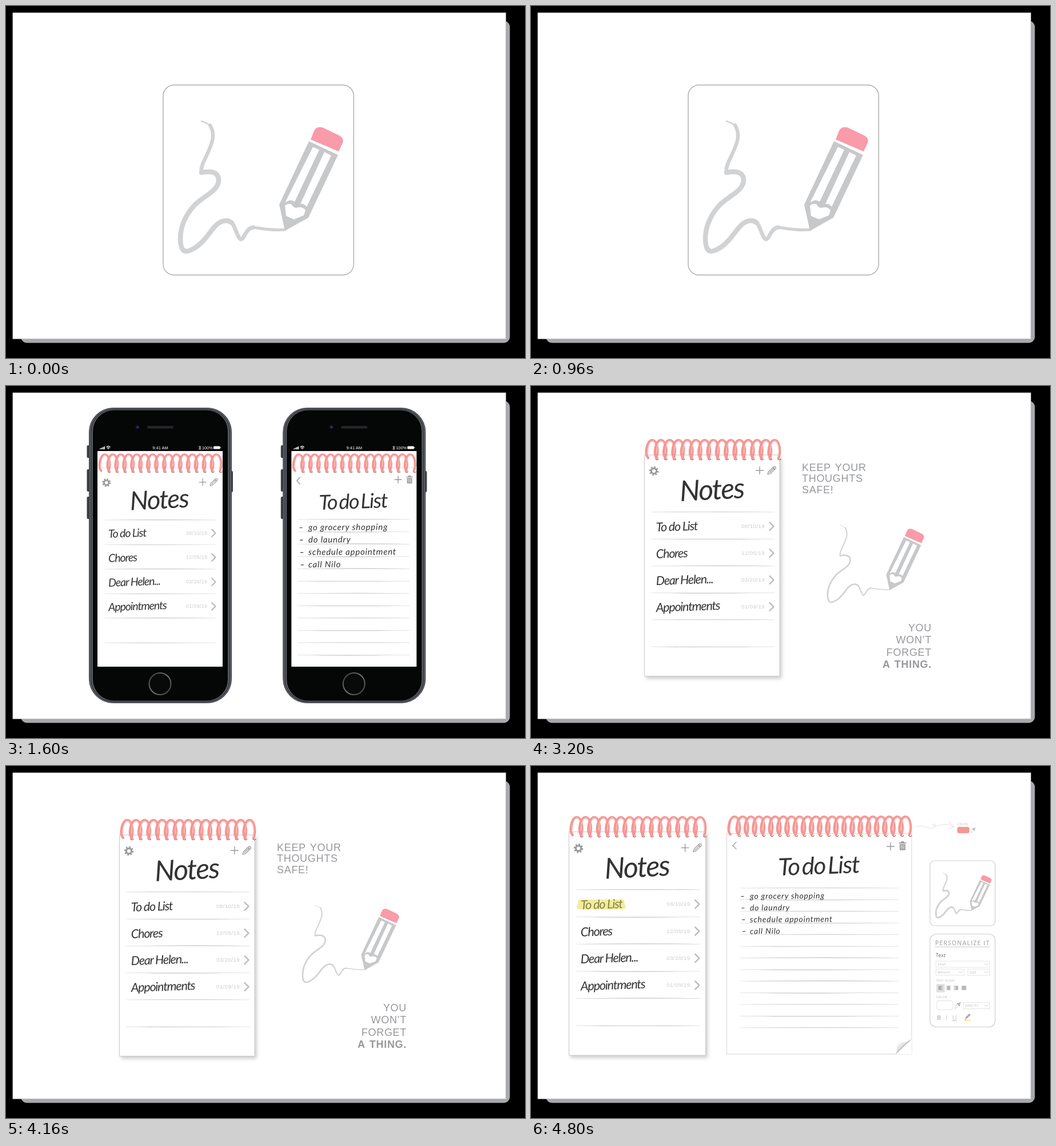
An HTML page that plays this animation: 908 px wide and 617 px high, repeating every 6400 ms.

```html
<!DOCTYPE html>
<html lang="en">
<head>
<meta charset="utf-8">
<title>Notes app</title>
<style>
html, body { margin: 0; width: 100%; height: 100%; overflow: hidden; background: #000; }
svg { display: block; }
text { white-space: pre; }
.hand { font-family: Lato, "Open Sans", sans-serif; font-style: italic; fill: #333; }
.title { word-spacing: -.1em; }
.sans { font-family: "Liberation Sans", Arial, sans-serif; }
.ui { font-family: "Open Sans", sans-serif; }
.line { fill: none; stroke-linecap: round; stroke-linejoin: round; }
.paper { fill: #fff; stroke: #ccc; filter: drop-shadow(3px 4px 3px #0003); }
</style>
</head>
<body>
<svg id="stage" width="908" height="617" viewBox="0 0 908 617"></svg>
<script>
const range = (n, f) => Array.from({ length: n }, (_, i) => f(i)).join('');
const group = (x, y, s, body) => `<g transform="translate(${x} ${y}) scale(${s})">${body}</g>`;
const line = (d, color, w) =>
  `<path class="line" d="${d}" stroke="${color}" stroke-width="${w}"/>`;
const shape = (d, color) => `<path d="${d}" fill="${color}"/>`;
const box = (x, y, w, h, r, fill, stroke = 'none', sw = 1) =>
  `<rect x="${x}" y="${y}" width="${w}" height="${h}" rx="${r}" fill="${fill}" stroke="${stroke}" stroke-width="${sw}"/>`;
const text = (cls, x, y, size, str, gap = 0, more = '') =>
  `<text class="${cls}" x="${x}" y="${y}" font-size="${size}" letter-spacing="${gap}" ${more}>${str}</text>`;
const tilt = (x, y, a) => `transform="rotate(${a} ${x} ${y})"`;

// Pencil with its scribble, in the coordinates of the large icon
function scribble(w) {
  const ink = '#d1d2d4';
  return line('M342 202 Q358 206 362 219', ink, w * .3) +
    line('M357 209 C368 228 359 244 350 264 C344 276 340 285 342 292', ink, w * .75) +
    line(`M342 292 C357 289 371 290 372 304 C373 324 345 333 329 350 C312 369 305 389 305 409
      C306 426 309 432 320 429 C341 422 353 401 364 388 C374 376 387 373 395 380`, ink, w) +
    line('M395 380 C402 387 404 406 411 409 C418 408 419 389 433 388', ink, w * .8) +
    line('M433 388 C447 390 465 394 488 392', ink, w * .6);
}
const pencil =
  shape('M533 234 L539 219 Q543 210 554 213 L581 226 Q592 231 589 240 L582 255Z', '#f99ba8') +
  shape('M530 237 L581 261 L529 371 L488 394 L478 348Z', '#c7c8ca') +
  shape('M537 247 L548 252 L505 343 Q497 337 488 345Z M557 256 L569 262 L526 352 Q521 346 515 347Z', '#fff') +
  shape('M488 350 Q494 344 500 348 Q504 356 511 353 Q520 352 524 358 L521 367 L504 374 L490 368Z', '#fff');
const icon = (x, y, s, w) => group(x, y, s, scribble(w) + pencil);

function coil(x, y, w, n) {
  const step = (w - 22) / (n - 1);
  return range(n, i => group(x + i * step, y, 1,
    line('M4 33 C-3 26 2 2 11 2 C19 2 23 20 18 33', '#f59693', 4.4) +
    line('M4 24 C3 12 7 3 12 3 C18 6 20 20 17 31', '#fcc4c1', 1.2) +
    line('M17 35 q3 3 5 0', '#b87272', 1.4)));
}

// Ruled lines, slightly bowed and tapering at the ends
const rules = (x, y, w, step, n) => range(n, i => {
  const b = y + i * step, bend = i % 2 ? 1 : -1;
  return shape(`M${x} ${b} Q${x + w * .4} ${b + bend + .7} ${x + w} ${b} Q${x + w * .6} ${b + bend - .7} ${x} ${b}Z`, '#aaa') +
    line(`M${x} ${b} h${w}`, '#d4d4d4', .6);
});

const plus = (x, y, r) => line(`M${x - r} ${y} h${2 * r} M${x} ${y - r} v${2 * r}`, '#999', 1.4);
const chevron = (x, y, w, h, color, sw) => line(`M${x} ${y - h} l${w} ${h} l${-w} ${h}`, color, sw);
const gear = (x, y) => `<g fill="none" stroke="#999"><circle cx="${x}" cy="${y}" r="4.6" stroke-width="3"/>
  <circle cx="${x}" cy="${y}" r="6.9" stroke-width="2.6" stroke-dasharray="2.71"/></g>`;
const pen = (x, y, s) => group(x, y, s,
  line('M-7 7 L-5.5 2 L4 -7 Q7 -8 7.5 -4 L-2 5.5Z M2 -5 L5.5 -1.5 M-4 4 L5 -5', '#999', 1.2));
const trash = (x, y, s) => group(x, y, s,
  line('M-6 -5 H6 M-2 -5 V-7 H2 V-5', '#888', 1.3) + box(-5, -3, 10, 10.5, 1, '#999') +
  line('M-2.5 -1 V5 M0 -1 V5 M2.5 -1 V5', '#fff', .9));

const entries = [['To do List', '08/10/19'], ['Chores', '12/05/19'],
  ['Dear Helen...', '03/20/19'], ['Appointments', '01/09/19']];

function notes(marked) {
  return coil(201, 93, 236, 15) + gear(215, 149) + plus(400, 148, 6.5) + pen(421, 148, 1) +
    text('hand', 261, 202, 50, 'Notes', -1.8, tilt(261, 202, -3)) +
    rules(211, 221, 215, 47.2, 6) +
    (marked ? line('M219 243 H290 M217 250 H292', '#f3ec9b', 10) : '') +
    entries.map(([name, date], i) => {
      const y = 255 + i * 47;
      return text('hand', 219, y, 21.5, name, -1.2,
          tilt(219, y, -2) + (marked && !i ? ' style="fill:#85834a"' : '')) +
        text('sans', 368, y - 6, 9.5, date, .5, 'fill="#ccc"') +
        chevron(417.5, y - 9, 7, 7, '#bbb', 2.4);
    }).join('');
}

const tasks = ['go grocery shopping', 'do laundry', 'schedule appointment', 'call Nilo'];
const todo = (x, y, size, step) => tasks.map((task, i) => {
  const b = y + i * step;
  return line(`M${x + i * .8} ${b - 4.5} h4`, '#333', 1.2) +
    text('hand', x + 15, b, size, task, .8, tilt(x, b, -.3));
}).join('');
const todoTitle = (x, y, size) => text('hand title', x, y, size, 'To do List', -1.5, tilt(x, y, -2));

const phone = `
  <g fill="#3b3c42"><rect x="141.5" y="104" width="6" height="22" rx="2"/>
  <rect x="141.5" y="146" width="6" height="39" rx="2"/><rect x="141.5" y="194" width="6" height="39" rx="2"/>
  <rect x="391" y="149" width="6" height="37" rx="2"/></g>` +
  box(145.5, 38.5, 249, 517, 42, '#5a5b61', '#3f4046') +
  box(149, 41, 242, 512, 39, '#5a5b61', '#2f3035', 1.2) +
  box(152, 42.5, 236, 509, 37, '#050606') +
  `<circle cx="230" cy="72" r="3.6" fill="#10182e"/><circle cx="230" cy="72" r="1.6" fill="#263f82"/>` +
  box(247, 70, 46, 4.5, 2.2, '#25262a') +
  `<circle cx="269.5" cy="522" r="19" fill="#080909" stroke="url(#ring)" stroke-width="2"/>` +
  box(160, 114, 219, 378, 0, '#fff') +
  range(4, i => box(164 + i * 2.4, 109.5 - i * 1.2, 1.7, 1.5 + i * 1.2, .3, '#fff')) +
  line('M176 107 q3 -3 6 0 M177.5 109 q1.5 -1.5 3 0', '#fff', 1.2) +
  shape('M178 110 h2 l-1 1z', '#fff') +
  text('sans', 270, 111, 7.5, '9:41 AM', 0, 'fill="#fff" text-anchor="middle"') +
  line('M337 106 l4 4 l-2 2 v-7 l2 2 l-4 4', '#fff', .7) +
  text('sans', 343, 111, 7.3, '100%', 0, 'fill="#fff"') +
  box(363, 105.5, 11.5, 5, 1, '#fff') + box(375, 107, 1, 2, .4, '#fff') +
  line('M160 143 H379', '#ddd', .8);

const phones = phone + group(-20.2, 33.7, .911, notes()) +
  group(339.3, 0, 1, phone + group(-20.2, 33.7, .911, coil(201, 93, 236, 15))) +
  chevron(514, 166, -5, 6, '#aaa', 1.8) + plus(686, 164, 6) + trash(706, 164, .9) +
  todoTitle(548, 217, 36) + rules(510, 234, 196, 21.6, 12) + todo(514, 253, 15, 21.7);

const slogan = (x, anchor, rows) => rows.map(([y, str, weight = 400]) =>
  text('sans', x, y, 18, str, .7,
    `fill="#97989b" word-spacing="2" text-anchor="${anchor}" font-weight="${weight}"`)).join('');

const promo = '<rect class="paper" x="198.5" y="121" width="236.5" height="387.5"/>' + notes() +
  slogan(474, 'start', [[149, 'KEEP YOUR'], [168, 'THOUGHTS'], [188, 'SAFE!']]) +
  icon(338, 124.3, .593, 4.5) +
  slogan(701, 'end', [[430, 'YOU'], [451, 'WON’T'], [473, 'FORGET'], [494, 'A THING.', 700]]);

const label = (x, y, str, size = 5.2) => text('ui', x, y, size, str, .4, 'fill="#b4b4b4"');
const select = (x, y, w, str) => box(x, y, w, 11, 0, '#fff', '#e2e2e2', .9) + label(x + 3, y + 7.5, str) +
  line(`M${x + w - 9} ${y + 4} l3 3 l3 -3`, '#c4c4c4', .9);
const dropper = (x, y, s) => group(x, y, s,
  line('M-5 6 L-4 3 L1 -2 L3 0 L-2 5Z', '#ccc', 1) + line('M0 -3 L4 1 M3 -2 L5 -4', '#aaa', 2.2));
const align = (x, inset) => range(5, i =>
  line(`M${x + (i % 2 ? inset[0] : 0)} ${386 + i * 1.5} h${7 - (i % 2 ? inset[1] : 0)}`, '#888', .9));

const panel = box(698, 294.5, 114, 163, 11, '#fff', '#cfcfcf', 1.2) +
  text('ui', 707, 313.5, 10.6, 'PERSONALIZE IT', 1, 'fill="#b2b2b2" font-weight="600"') +
  line('M707 317 H802', '#c4c4c4', 1) +
  text('ui', 708, 335, 8.5, 'Text', .4, 'fill="#666"') +
  select(708.5, 342, 94, 'FONT') + select(708.5, 356, 49, 'WEIGHT') + select(764.5, 356, 38, 'SIZE') +
  label(709, 378, 'TEXT ALIGN') + box(710, 383, 13, 13, 0, '#e4e4e4', '#ccc', .8) +
  align(713, [0, 3]) + align(727, [1.5, 3]) + align(740, [3, 3]) + align(754, [0, 0]) +
  label(709, 407, 'COLOR') + box(710, 411.5, 28, 15.5, 3, '#fff', '#e2e2e2') + dropper(746, 419, .95) +
  select(756.5, 414.5, 46, 'OPACITY') +
  text('ui', 710, 445, 11, 'B', 0, 'fill="#c4c4c4" font-weight="700"') +
  text('ui', 725, 445, 11, 'I', 0, 'fill="#c4c4c4" font-style="italic"') +
  text('ui', 737, 445, 11, 'U', 0, 'fill="#c4c4c4" text-decoration="underline"') +
  line('M759 446 H769', '#f3e77c', 1.5) + line('M762 441 L767 436', '#aaa', 3.2) + line('M760 444 l2 -2', '#bbb', 2);

const editor = '<rect class="paper" x="66.5" y="115.5" width="239" height="391.5"/>' +
  group(-133.8, -5.9, 1.0085, notes(true)) +
  box(342.5, 118.5, 323.5, 386.5, 0, '#fff', '#d4d4d4') +
  coil(345, 87, 321, 22) + chevron(359, 139.5, -6, 6, '#aaa', 1.6) + plus(629, 141, 6.5) + trash(650, 140, 1) +
  todoTitle(433, 192, 42) + rules(366, 214, 277, 20.4, 13) + todo(368, 233, 14, 20.5) +
  shape('M638 505 L666 478 V505Z', '#fff') +
  shape('M639 504 Q642 493 638 481 Q650 490 666 478Z', 'url(#curl)') +
  line('M639 504 L664 480', '#aaa', 1) +
  line('M672 107 C689 101 694 113 706 108 C711 104 704 99 703 103 C706 111 723 96 738 106 M731 97 L740 107 L728 110', '#e9e9e9', 1.2) +
  label(746, 104, 'COLOR', 5) + box(746, 107, 20.5, 10.5, 2.5, '#f6968f', '#dcaaa5', .8) + dropper(773, 112, .75) +
  box(698, 166, 114, 114, 8, '#fff', '#cfcfcf', 1.2) + icon(604, 118.8, .342, 8.5) + panel;

const cover = box(275, 138.5, 333.3, 333, 19, '#fff', '#acacae', 1.4) + icon(0, 0, 1, 8.5);

const stage = document.getElementById('stage');
stage.innerHTML = `<defs>
  <linearGradient id="curl" x1="0" y1="0" x2="1" y2="1"><stop offset=".2" stop-color="#fff"/>
    <stop offset=".45" stop-color="#ddd"/><stop offset=".6" stop-color="#999"/></linearGradient>
  <linearGradient id="ring" x1="0" y1="0" x2="1" y2="1"><stop stop-color="#3a3b3e"/>
    <stop offset=".5" stop-color="#77787c"/><stop offset="1" stop-color="#3a3b3e"/></linearGradient></defs>` +
  box(26, 26, 855.5, 564.5, 11, '#a7a9ac') + box(12, 12, 862.3, 571.3, 0, '#fff', '#c8c9cb') +
  [cover, phones, promo, editor].map(s => `<g class="scene">${s}</g>`).join('');

const scenes = document.querySelectorAll('.scene');
function draw() {
  const now = Math.floor(performance.now() / 1600) % scenes.length;
  scenes.forEach((s, i) => { s.style.display = i === now ? '' : 'none'; });
  requestAnimationFrame(draw);
}
draw();
</script>
</body>
</html>
```
